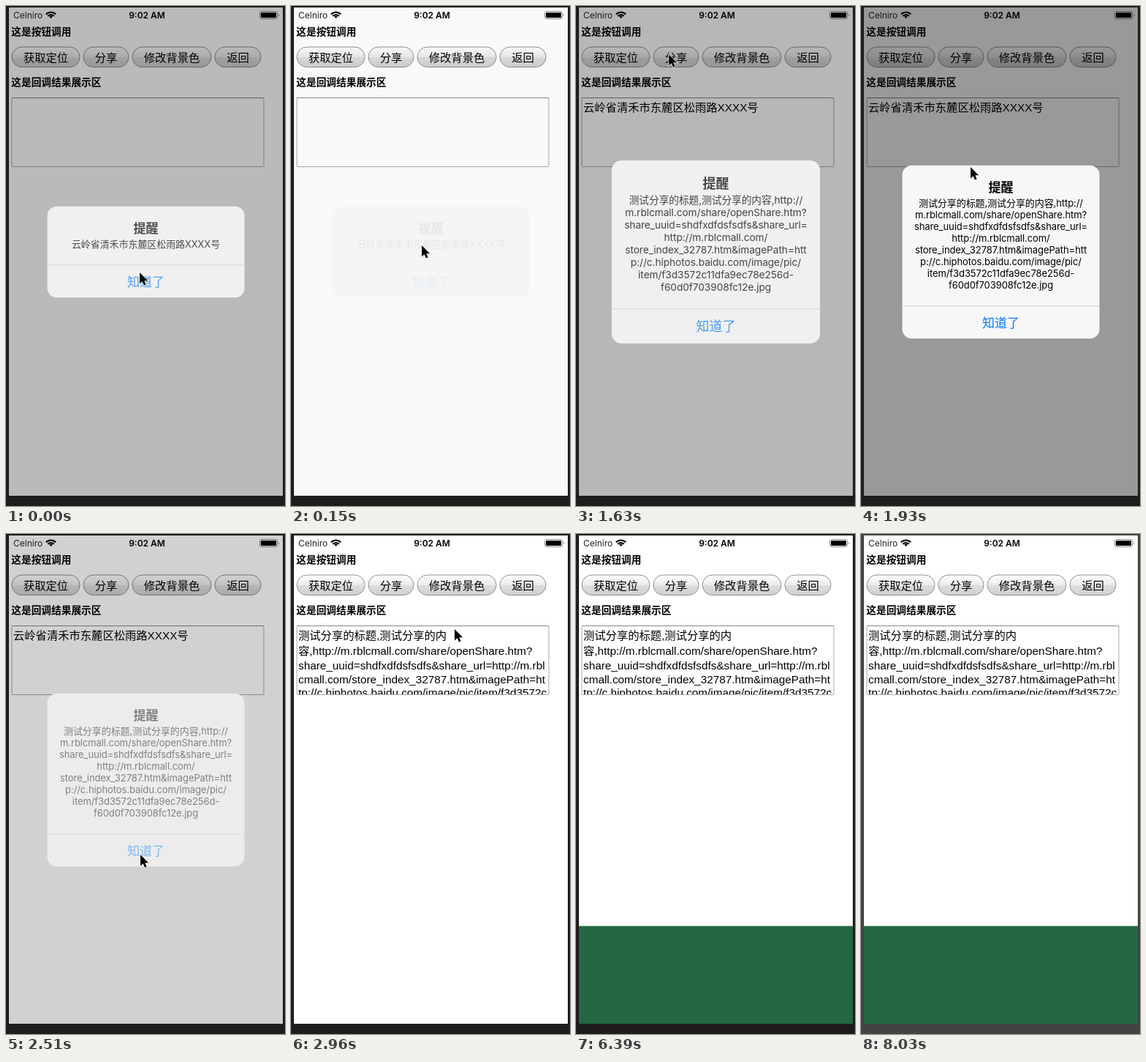
Write an HTML page that moves like this. It is 382 px wide and 683 px high and loops after 8130 ms.

```html
<!DOCTYPE html>
<html lang="zh-CN">
<head>
<meta charset="utf-8">
<title>WebView</title>
<style>
  html, body { margin: 0; width: 100%; height: 100%; overflow: hidden; background: #1e1c1d; }
  svg { display: block; width: 382px; height: 683px; }
  text { font-family: Inter, "Noto Sans CJK SC", "Noto Sans CJK", sans-serif; }
  .cjk { font-family: "Noto Sans CJK SC", "Noto Sans CJK", sans-serif; }
  .bold { font-weight: 700; }
  .mid { text-anchor: middle; }
  .area { font: 15.3px "Liberation Sans", "Noto Sans CJK SC", "Noto Sans CJK", sans-serif; }
  .msg { font-size: 13px; letter-spacing: -.08px; }
</style>
</head>
<body>
<svg viewBox="0 0 382 683">
  <defs>
    <linearGradient id="btn" x2="0" y2="1">
      <stop offset="0" stop-color="#fff"/>
      <stop offset=".5" stop-color="#ebebeb"/>
      <stop offset=".5" stop-color="#dedede"/>
      <stop offset="1" stop-color="#d0d0d0"/>
    </linearGradient>
    <clipPath id="areaClip"><rect x="8" y="126" width="345" height="93"/></clipPath>
    <clipPath id="screen"><rect x="4" y="2" width="375" height="667"/></clipPath>
  </defs>
  <rect id="frame" width="382" height="683"/>
  <g clip-path="url(#screen)">
    <rect x="4" y="2" width="375" height="667" fill="#fff"/>
    <rect id="green" x="4" y="535.5" width="375" height="134" fill="#236842"/>

    <text x="10" y="17" font-size="12" fill="#222">Celniro</text>
    <g fill="none" stroke="#000" stroke-width="2">
      <path d="M54.8 11.2a9.4 9.4 0 0 1 13.4 0M57.2 13.7a6 6 0 0 1 8.6 0"/>
      <path d="M61.5 17l-2.3-2.4a3.3 3.3 0 0 1 4.6 0z" fill="#000" stroke="none"/>
    </g>
    <text class="mid" x="193" y="17" font-size="12" font-weight="600">9:02 AM</text>
    <rect x="347.5" y="7.5" width="24" height="10" rx="2.5" fill="none" stroke="#888"/>
    <rect x="349" y="9" width="21" height="7" rx="1.2"/>
    <path d="M373 10.5q1.6 2 0 4z" fill="#777"/>

    <text class="cjk bold" x="7.3" y="40" font-size="13.7">这是按钮调用</text>
    <text class="cjk bold" x="7.3" y="109.3" font-size="13.7">这是回调结果展示区</text>
    <g id="buttons"></g>

    <rect x="8" y="125.5" width="345" height="94" rx="1" fill="#fff" stroke="#aaa"/>
    <path d="M8 125.5h345" stroke="#888"/>
    <g id="area" class="area" clip-path="url(#areaClip)"></g>

    <rect id="dim" x="4" y="2" width="375" height="667"/>
    <g id="alert"></g>
  </g>
  <path id="cursor" d="M0 0V15.6L3.6 12.2 6 17.6 8.6 16.5 6.3 11.2H11.2Z" stroke="#fff" stroke-width="1.2" paint-order="stroke"/>
</svg>
<script>
const LOOP = 8130;
const $ = id => document.getElementById(id);

const address = ['云岭省清禾市东麓区松雨路XXXX号'];
const shared = [
  '测试分享的标题,测试分享的内',
  '容,http://m.rblcmall.com/share/openShare.htm?',
  'share_uuid=shdfxdfdsfsdfs&share_url=http://m.rbl',
  'cmall.com/store_index_32787.htm&imagePath=ht',
  'tp://c.hiphotos.baidu.com/image/pic/item/f3d3572c'
];
const sharedAlert = [
  '测试分享的标题,测试分享的内容,http://',
  'm.rblcmall.com/share/openShare.htm?',
  'share_uuid=shdfxdfdsfsdfs&share_url=',
  'http://m.rblcmall.com/',
  'store_index_32787.htm&imagePath=htt',
  'p://c.hiphotos.baidu.com/image/pic/',
  'item/f3d3572c11dfa9ec78e256d-',
  'f60d0f703908fc12e.jpg'
];
const areaBaselines = [144, 165, 185.3, 203.5, 221.5];

const buttons = [
  [8, 93, '获取定位'], [106, 62, '分享'], [173, 108, '修改背景色'], [286, 63, '返回']
];

// time, x, y
const cursorTrack = [
  [0, 183, 364], [150, 179, 327], [300, 163, 240], [450, 143, 140], [600, 131, 85],
  [740, 128, 69], [890, 127, 66], [1780, 130, 90], [1930, 150, 220], [2070, 176, 370],
  [2220, 184, 438], [2660, 188, 410], [2810, 205, 280], [2960, 224, 130], [3110, 229, 72],
  [4450, 237, 90], [4600, 262, 136], [4740, 290, 176], [4890, 308, 178], [5040, 314, 167],
  [5940, 315, 135], [6090, 317, 88], [6240, 318, 70], [6390, -50, -50]
];
// time, opacity, scale
const alertTrack = [
  [0, .68, 1], [150, .06, 1], [300, 0, 1], [1630, .71, 1.057], [1780, .95, 1.01],
  [1930, 1, 1], [2510, .45, 1], [2660, .02, 1], [2810, 0, 1]
];
// time, pressed button
const pressTrack = [[0, -1], [1490, 1], [1630, -1], [4000, 2], [4150, -1], [6240, 3], [6390, -1]];
// opacity, panel grey level
const panelTone = [[0, 252], [.06, 245], [.45, 236], [.7, 240], [1, 247]];

const hold = (track, t) => track.findLast(k => k[0] <= t);

function lerp(points, x) {
  const i = Math.max(1, points.findIndex(p => p[0] >= x));
  const [a, b] = [points[i - 1], points[i]];
  return a[1] + (b[1] - a[1]) * (x - a[0]) / (b[0] - a[0]);
}

const esc = s => s.replace(/&/g, '&amp;');

const drawArea = lines => lines.map((s, i) =>
  `<text class="area" x="10" y="${areaBaselines[i]}">${esc(s)}</text>`).join('');

function drawAlert(lines, p, scale) {
  if (!p) return '';
  const cx = 191.5, cy = 336, h = 124.5 + (lines.length - 1) * 16;
  const top = cy - h / 2, bottom = cy + h / 2, tone = Math.round(lerp(panelTone, p));
  const body = lines.map((s, i) =>
    `<text class="msg mid" x="${cx}" y="${top + 56 + i * 16}">${esc(s)}</text>`).join('');
  return `<g transform="translate(${cx} ${cy}) scale(${scale}) translate(${-cx} ${-cy})">
    <rect x="56.5" y="${top}" width="270" height="${h}" rx="13" fill="rgb(${tone},${tone},${tone})"/>
    <g opacity="${p}">
      <path d="M56.5 ${bottom - 44.5}h270" stroke="#000" stroke-opacity=".14"/>
      <text class="cjk mid bold" x="${cx}" y="${top + 36}" font-size="17">提醒</text>
      ${body}
      <text class="cjk mid" x="${cx}" y="${bottom - 15.6}" font-size="17" fill="#007aff">知道了</text>
    </g></g>`;
}

$('buttons').innerHTML = buttons.map(([x, w, label]) => {
  const box = `x="${x}" y="56" width="${w}" height="27.5" rx="13.75"`;
  return `<rect ${box} fill="url(#btn)" stroke="#8f8f8f"/>
    <text class="cjk mid" x="${x + w / 2}" y="75.8" font-size="15.3">${label}</text>
    <rect class="press" ${box} fill="#000" fill-opacity=".25"/>`;
}).join('');
const presses = document.querySelectorAll('.press');

function put(node, html) {
  if (node.last !== html) node.innerHTML = node.last = html;
}

function render(t) {
  const [, x, y] = hold(cursorTrack, t);
  const [, p, scale] = hold(alertTrack, t);
  const pressed = hold(pressTrack, t)[1];
  $('cursor').setAttribute('transform', `translate(${x} ${y})`);
  $('dim').setAttribute('opacity', .4 * p);
  $('green').setAttribute('visibility', t >= 4150 ? 'visible' : 'hidden');
  $('frame').setAttribute('fill', t >= 8030 ? '#444344' : '#1e1c1d');
  presses.forEach((el, i) => el.setAttribute('visibility', i === pressed ? 'visible' : 'hidden'));
  put($('area'), drawArea(t < 300 ? [] : t < 2810 ? address : shared));
  put($('alert'), drawAlert(t < 1000 ? address : sharedAlert, p, scale));
}

const start = performance.now();
function tick() {
  render((performance.now() - start) % LOOP);
  requestAnimationFrame(tick);
}
tick();
</script>
</body>
</html>
```
